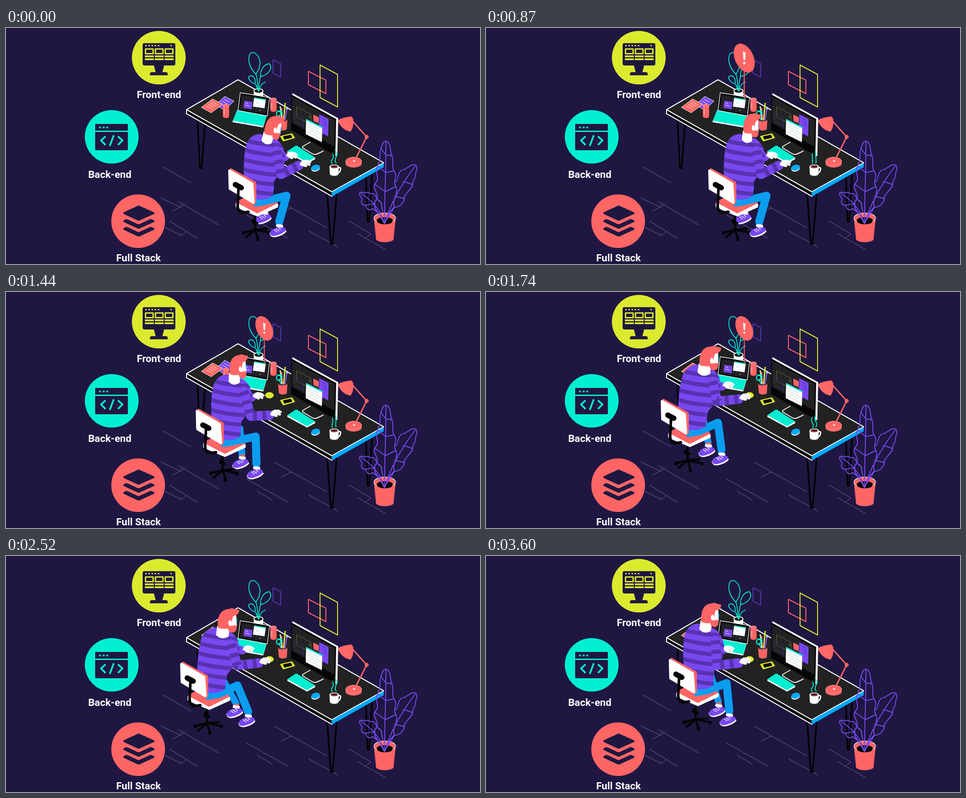
Write an HTML page that moves like this. It is 1058x529 px and loops after 3.63 s.

```html
<!DOCTYPE html>
<html lang="en">
<head>
<meta charset="utf-8">
<title>Developer at a desk</title>
<style>
html, body { margin: 0; width: 100%; height: 100%; overflow: hidden; background: #1f1742; }
svg { display: block; width: 100%; height: 100%; }
text { font: 700 22.5px Roboto, Arial, sans-serif; fill: #fff; }
.bg { fill: #1f1742; } .y { fill: #dcea2e; } .t { fill: #00efd1; } .c { fill: #ff6565; }
.p { fill: #7848f0; } .b { fill: #00a9ff; } .w { fill: #fff; } .k { fill: #050505; }
.line { fill: none; stroke-linecap: round; stroke-linejoin: round; }
.butt { stroke-linecap: butt; }
.sy { stroke: #dcea2e; } .st { stroke: #00efd1; } .sc { stroke: #ff6565; }
.sp { stroke: #7848f0; } .sd { stroke: #5733b0; } .sb { stroke: #0a9df0; }
.sw { stroke: #fff; } .sk { stroke: #050505; } .sf { stroke: #51456f; }
#sign { transform-origin: 577px 158px; animation: sign 3630ms linear infinite; }
@keyframes sign {
  0%, 19.3% { transform: scale(0); opacity: 1; }
  23.7% { transform: scale(1.2); }
  27.5%, 57.3% { transform: none; opacity: 1; }
  61.2%, 99.9% { transform: none; opacity: 0; }
  100% { transform: scale(0); opacity: 0; }
}
#steam { animation: steam 605ms ease-in-out infinite alternate; }
@keyframes steam {
  from { d: path("M728 304C721 297 736 292 729 282M737 303C729 294 744 288 735 274"); }
  to { d: path("M729 304C736 297 722 292 728 281M736 303C744 294 729 288 736 277"); }
}
</style>
</head>
<body>
<svg viewBox="0 0 1058 529" preserveAspectRatio="none">
<defs>
  <clipPath id="shirt"><path id="shirtShape" d="M570 238C555 236 541 246 536 263C530 288 530 318 532 350L558 384Q580 388 596 376L598 344C604 334 614 326 620 308Q626 288 618 267Q611 252 597 246Q582 258 570 238Z"/></clipPath>
  <g id="can"><path class="c" d="M-7 0V24A7 4 0 0 0 7 24V0Z"/><ellipse rx="7" ry="4" fill="#ff8d88"/><ellipse rx="4" ry="2" class="c"/><path class="line sw" stroke-width=".8" d="M-4 8V20"/></g>
  <g id="shoe">
    <path class="w" d="M-18 4Q-17 13-6 13Q14 9 20 0L18-4L-16 2Z"/>
    <path class="p" d="M-17 5Q-16-5-3-8L7-11Q18-10 19-3Q12 6-6 10Q-16 11-17 5Z"/>
    <path class="line sw" stroke-width="1.5" d="M-7-4L-1 1M-3-6L4-1M3-8L7-4"/>
    <path class="line sw" stroke-width="7" d="M0-13L9-12"/>
  </g>
  <g id="hand">
    <path class="w" d="M-13 2Q-11-7-1-8L8-6L14-1L13 2L10 2L11 6L8 8L3 5L3 8L-1 9L-6 6Z"/>
    <path class="line" stroke="#aaa" stroke-width=".7" d="M3-2L10 2M0 1L6 5"/>
  </g>
</defs>

<!-- services -->
<circle class="y" cx="341" cy="66.500" r="60"/>
<g class="bg">
  <rect x="305" y="34" width="73" height="50" rx="4"/>
  <path d="M330 84H353L349 99H358Q361 99 361 106H321Q321 99 325 99H334Z"/>
</g>
<path class="line butt sy" stroke-width="3" stroke-dasharray="3 4" d="M311 39.500H344M367 39.500H371"/>
<g id="panes" class="line butt sy"></g>
<text x="292" y="156.500">Front-end</text>

<circle class="t" cx="236" cy="244" r="60"/>
<rect class="bg" x="199" y="215" width="73" height="59" rx="2"/>
<path class="line butt st" stroke-width="4" stroke-dasharray="4 4" d="M208 223H230"/>
<path class="line butt st" stroke-width="3" d="M199 231.500H272"/>
<path class="line st" stroke-width="4" d="M221 244L212 252L221 261M240 242L232 263M251 244L260 252L251 261"/>
<text x="183.500" y="335.500">Back-end</text>

<circle class="c" cx="295" cy="433" r="60"/>
<g class="bg">
  <path d="M293 399Q296 397 299 399L330 413Q333 415 330 417L299 431Q296 433 293 431L263 417Q260 415 263 413Z"/>
  <path id="layer" d="M263 431L269 428L293 439Q296 441 299 439L323 428L330 431Q333 433 330 435L299 449Q296 451 293 449L263 435Q260 433 263 431Z"/>
  <use href="#layer" y="17.500"/>
</g>
<text x="246" y="523">Full Stack</text>

<!-- floor and wall -->
<path class="line sf" stroke-width="1.500" d="M349 311L413 347M346 381L391 403M386 390L474 441M372 411L398 395M366 433L426 471M352 446L392 465M389 466L404 456M600 382L716 448M614 415L638 403M537 419L628 471M561 447L594 466M676 455L741 491M765 432L815 462M785 461L848 497M800 472L815 462"/>
<g class="line" stroke-width="2">
  <path stroke="#5335a6" d="M596 71L613 80V110L596 101Z"/>
  <path class="sc" d="M675 97L714 117V147L675 127Z"/>
  <path class="sy" d="M701 83L740 104V177L701 156Z"/>
</g>

<!-- desk -->
<path class="line sk" stroke-width="4" d="M427 205L433 314H437L444 214M803 322L807 434H811L818 316M717 371L725 484H729L738 371"/>
<path class="k" d="M403 183V193L727 378V367Z"/>
<path class="b" d="M727 367L843 302V312L727 378Z"/>
<path fill="#222223" d="M518 116L403 183L727 368L843 302Z"/>
<path class="line sw" stroke-width="2.200" d="M727 367L403 183L518 116L843 302M403 184V192L727 377"/>
<path class="line sw" stroke-width="1.800" d="M727 367L843 302"/>

<!-- papers, cans -->
<path class="p" stroke="#fff" d="M488 153L509 164L487 184L469 172Z"/>
<path class="c" stroke="#fff" d="M461 159L484 171L458 190L436 178Z"/>
<path class="line sw" stroke-width="1" d="M459 165L473 172M455 168L469 175M451 171L464 178M447 175L459 181M487 160L499 166M483 164L494 170"/>
<use href="#can" x="491" y="174"/>

<!-- small plant -->
<path class="w" d="M553 141V153A10 5 0 0 0 574 153V141Z"/>
<ellipse class="k" cx="563.500" cy="141" rx="10" ry="5" stroke="#fff" stroke-width="2"/>
<path class="line st" stroke-width="1.800" d="M562 141C561 126 562 113 558 104C546 92 538 74 544 59C551 48 566 60 567 78C567 90 562 96 558 104M564 141C564 128 566 116 568 109C567 96 574 82 587 80C596 86 590 104 568 109M562 141C561 133 559 129 556 125C546 122 540 114 542 109C550 103 558 112 556 125M565 141C566 131 571 124 579 121"/>
<use href="#can" x="597" y="160"/>

<!-- laptop -->
<path class="w" d="M516 184L582 196L574 223L505 211Z"/>
<path class="t" d="M517 183L582 195L574 220L506 208Z"/>
<path class="k" stroke="#fff" stroke-width="1.300" d="M523 145L588 156L583 197L518 185Z"/>
<path fill="#222127" d="M526 150L584 159L580 192L522 182Z"/>
<path class="p" d="M532 163L550 166L548 182L530 179Z"/>
<path class="w" d="M554 156L580 160L577 180L551 176Z"/>
<path class="line st" stroke-width="2" d="M555 157L579 161"/>
<path class="line sw" stroke-width="1" d="M535 168L540 169M534 173L544 175M566 184H568"/>

<!-- desk things -->
<path class="line sy" stroke-width="3" d="M623 169L620 206"/>
<path class="line sc" stroke-width="3" d="M615 180L617 206"/>
<path class="line sp" stroke-width="3" d="M627 181L623 206"/>
<path class="line sw" stroke-width="2" d="M612 176L616 205M628 178L627 182"/>
<path class="line st" stroke-width="2.500" d="M614 206L610 196M612 196A4 5 0 1 1 605 188A4 5 0 1 1 612 196M609 187A4 4 0 1 1 615 193"/>
<path class="c" d="M607 205L609 225A9 5 0 0 0 627 225L628 205A10 4 0 0 1 607 205Z"/>
<path class="y" stroke="#dcea2e" stroke-width="2" stroke-linejoin="round" d="M613 243L638 237L644 246L619 253Z"/>
<path class="k" d="M618 243L636 239L639 246L621 250Z"/>
<ellipse class="y" cx="588" cy="231.500" rx="9.500" ry="7"/>

<path class="line sw" stroke-width="2" d="M679 256L663 265Q660 268 664 270L684 282Q689 285 695 282L708 276"/>
<path class="w" stroke="#fff" stroke-width="3" stroke-linejoin="round" d="M640 148L740 203L738 286L735 284Z"/>
<path class="k" d="M637 149L737 204L735 286L636 228Z"/>
<path fill="#222225" d="M639 154L734 206L733 266L638 212Z"/>
<g class="line" stroke-width="1">
  <path stroke="#6b7030" d="M649 177L681 194V216L649 200Z"/>
  <path stroke="#493185" d="M645 190L663 200V220L645 210Z"/>
</g>
<path class="c" d="M686 194L698 200V214L686 208Z"/>
<path class="p" d="M699 193L720 204L719 243L699 233Z"/>
<path class="w" d="M670 204L706 222L705 256L669 238Z"/>
<path class="line st" stroke-width="3" d="M671 206L705 223"/>
<path class="line" stroke="#b8c4c9" stroke-width="1" d="M673 215L698 228M673 221L701 235M673 227L697 239M673 233L700 247"/>
<path class="line" stroke="#4c2aaa" stroke-width="1" d="M703 201L715 207M707 210L716 214M708 217L716 221"/>
<circle class="w" cx="678" cy="199" r="1"/>

<path class="w" d="M628 277L648 264L690 291V294L672 304L628 280Z"/>
<path class="t" d="M628 276L648 263L690 290L672 301Z"/>
<ellipse class="w" cx="691" cy="315" rx="10" ry="6.500" transform="rotate(-15 691 315)"/>
<ellipse class="b" cx="691" cy="313" rx="10" ry="6.500" transform="rotate(-15 691 313)"/>

<path class="line sw" stroke-width="3" d="M742 313Q749 311 746 320Q744 325 740 325"/>
<path class="w" d="M722 311L723 328A10 5 0 0 0 742 328L743 311Z"/>
<ellipse cx="732.500" cy="311" rx="10.500" ry="5" class="w"/>
<ellipse cx="732.500" cy="311" rx="8" ry="3.500" fill="#54201f"/>
<path class="line sc" stroke-width="1" d="M727 312Q733 316 738 312"/>
<path id="steam" class="line st" stroke-width="2" d="M728 304C721 297 736 292 729 282M737 303C729 294 744 288 735 274"/>

<path class="c" d="M758 299V304A18 9 0 0 0 794 304V299Z"/>
<ellipse class="c" cx="776" cy="299" rx="18" ry="9.500" stroke="#ff9a94"/>
<path class="line sc" stroke-width="3" d="M779 296L805 244L772 207"/>
<circle class="c" cx="805" cy="244" r="4.500"/>
<circle class="w" cx="777" cy="298" r="2"/>
<path class="c" d="M766 199Q773 196 775 205Q777 222 769 232Q750 230 740 207Q752 200 766 199Z"/>
<path class="line" stroke="#ff9a94" stroke-width="1" d="M740 207Q757 212 769 232"/>

<!-- big plant -->
<path class="c" d="M821 425L826 474A20 8 0 0 0 865 474L870 425Z"/>
<ellipse class="c" cx="845.500" cy="426" rx="24" ry="11.500" stroke="#fff" stroke-width="1.200"/>
<ellipse class="k" cx="845.500" cy="432" rx="18" ry="8"/>
<path class="line sp" stroke-width="2" d="M845 438C844 400 848 340 848 254M845 438C836 416 818 406 823 390C838 375 818 363 823 350C837 336 822 326 829 309C839 296 831 286 837 270Q842 251 850 254C861 262 856 274 861 286C868 300 859 309 866 320C876 333 862 344 870 355C878 370 862 383 866 395C868 410 853 419 845 438
M846 438C855 402 878 356 913 310M846 438C850 420 861 407 865 403C882 400 888 392 889 382C888 371 901 368 908 351C905 342 917 336 914 326Q920 311 914 307C899 305 897 317 884 318C873 325 878 335 870 345
M844 438C837 410 818 387 793 371M844 438C835 419 831 412 818 405C807 413 803 401 804 397C789 398 794 387 795 383Q785 371 792 368C803 371 808 366 813 371C824 369 825 379 831 386C842 391 837 402 841 411
M823 350L847 367L870 355M829 309L848 324L866 320M889 382L870 378M908 351L887 344M804 397L824 394M837 270L848 285L861 286"/>

<g id="sign">
  <path class="line sc" stroke-width="2" d="M576.500 105V158"/>
  <ellipse class="c" cx="576.500" cy="81.500" rx="17.500" ry="29" transform="rotate(-24 576.500 81.500)"/>
  <path class="w" d="M574 69L579 71L578 86L575 85Z"/><circle class="w" cx="576.500" cy="91" r="2.200"/>
</g>

<!-- person -->
<path id="farArm" class="line sp" stroke-width="18"/>
<use id="farHand" href="#hand"/>
<path id="farLeg" class="line sb" stroke-width="15"/>
<g id="farShoe"><use href="#shoe"/><path class="line sc" stroke-width="4" d="M1-18L9-17"/></g>
<g class="chair">
  <path class="line sk" stroke-width="5" d="M556 412V452M556 452L529 459M556 452L588 459M556 452L562 472M556 452L536 469M556 452L582 450M551 432L561 438"/>
  <path class="line sk" stroke-width="7" d="M530 458V460M588 459V461M562 471V475M552 431V435"/>
  <path class="w" stroke="#fff" stroke-width="5" stroke-linejoin="round" d="M515 394L560 372L605 396V400L561 420L515 400Z"/>
  <path class="c" stroke="#ff6565" stroke-width="3" stroke-linejoin="round" d="M515 390L560 368L605 392L561 414Z"/>
</g>
<path id="nearLeg" class="line sb" stroke-width="18"/>
<g id="torso">
  <use href="#shirtShape" class="p"/>
  <path id="stripes" class="line sd" stroke-width="9" clip-path="url(#shirt)"/>
</g>
<use id="nearShoe" href="#shoe"/>
<g id="head">
  <path class="w" d="M-12-18L-15 2Q-4 15 13 6L16-14Z"/>
  <path class="w" d="M12-41L31-42L32-16L14-10Z"/>
  <path class="c" d="M12-20L20-18L31-19Q33-6 25-3Q15-2 12-9Z"/>
  <path class="c" d="M-10-14C-13-40-3-56 17-56Q22-59 25-56Q32-54 38-53Q38-44 29-41L24-39Q21-32 21-24L17-19L13-12Q0-10-10-14Z"/>
  <ellipse class="w" cx="17" cy="-24" rx="4" ry="6.500"/>
  <path class="line sb" stroke-width="2" d="M32-32V-26"/>
</g>
<path id="nearArm" class="line sp" stroke-width="21"/>
<path id="sleeve" class="line butt sd" stroke-width="21" stroke-dasharray="9 12"/>
<use id="nearHand" href="#hand"/>
<g class="chair">
  <path class="c" stroke="#ff6565" stroke-width="5" stroke-linejoin="round" d="M502 317L556 347V392L551 394L500 330Z"/>
  <path class="w" stroke="#fff" stroke-width="6" stroke-linejoin="round" d="M499 320L549 349L552 391L500 360Z"/>
  <path class="line sk" stroke-width="12" d="M512 351L525 358"/>
  <path class="line sk" stroke-width="6" d="M519 358L517 398Q517 413 528 414L541 412"/>
</g>
</svg>

<script>
const LOOP = 3630;
const $ = id => document.getElementById(id);

// Each row: time in ms, then the values at that time.
const tracks = {
  chair: [[0, 0, 0, 0], [930, 0, 0, 0], [1080, -4, -3, -8], [1200, -9, -8, -13], [1600, -107, -77, 6],
    [1740, -106, -75, 10], [2160, -109, -77, 12], [2820, -106, -78, 5], [3230, -88, -86, -5]],
  head: [[0, 3, 8, .85], [300, 1, 3, .8], [510, 0, -3, .79], [930, 0, 0, .8], [1200, 1, -6, .8],
    [1740, 5, 0, 1], [2160, 6, 0, 1], [2820, 3, -2, 1], [3300, 0, 0, .97], [3600, 0, 0, .92]],
  farHand: [[930, 638, 285], [1200, 593, 264], [1640, 541, 208]],
  nearHand: [[930, 668, 303], [1200, 634, 319], [1640, 578, 235]],
  elbow: [[930, 614, 328], [1200, 586, 322], [1640, 516, 245]],
  knee: [[930, 626, 376], [1200, 618, 372], [1620, 518, 293], [2160, 516, 293], [2820, 517, 288], [3230, 537, 285]],
  farFoot: [[930, 573, 427], [1200, 570, 426], [1620, 492, 357], [2200, 492, 357], [2650, 514, 349], [3230, 515, 348]],
  nearFoot: [[930, 606, 456], [1200, 606, 455], [1620, 522, 376], [2160, 520, 375], [2650, 540, 370], [3230, 539, 369]]
};

function sample(rows, t) {
  const i = rows.findIndex(r => r[0] > t);
  if (i === 0) return rows[0].slice(1);
  if (i < 0) return rows[rows.length - 1].slice(1);
  const a = rows[i - 1], b = rows[i];
  const u = (t - a[0]) / (b[0] - a[0]), e = u * u * (3 - 2 * u);
  return a.slice(1).map((v, k) => v + (b[k + 1] - v) * e);
}

const place = (el, x, y, more = "") => el.setAttribute("transform", `translate(${x} ${y}) ${more}`);
const trace = (id, ...points) => $(id).setAttribute("d", "M" + points.join("L"));

function draw(t) {
  const p = {};
  for (const name in tracks) p[name] = sample(tracks[name], t);
  const [cx, cy, lean] = p.chair;
  const [nod, turn, wide] = p.head;
  const at = (x, y) => [cx + x, cy + y];
  const near = p.nearHand, far = p.farHand;

  document.querySelectorAll(".chair").forEach(el => place(el, cx, cy));
  const k = -lean / 137;
  $("torso").setAttribute("transform", `matrix(1 0 ${k} 1 ${cx - 385 * k} ${cy})`);
  place($("head"), cx + 583 + lean, cy + 248 + nod, `rotate(${turn}) scale(${wide} 1)`);

  trace("farArm", at(609 + lean * .7, 283), [far[0] - 14, far[1] + 4]);
  place($("farHand"), ...far);
  const arm = [at(604 + lean * .8, 275), p.elbow, [near[0] - 14, near[1] + 5]];
  trace("nearArm", ...arm);
  trace("sleeve", ...arm);
  place($("nearHand"), ...near, "rotate(-12)");

  const [fx, fy] = p.farFoot, [nx, ny] = p.nearFoot, [kx, ky] = p.knee;
  trace("farLeg", at(565, 374), [kx - 35, ky - 18], [fx + 4, fy - 20]);
  trace("nearLeg", at(558, 391), at(582, 387), [kx, ky], [nx + 4, ny - 22]);
  place($("farShoe"), fx, fy);
  place($("nearShoe"), nx, ny);
}

$("panes").innerHTML = [311.5, 333.5, 355.5].map(x =>
  `<path stroke-width="3" d="M${x} 47h17v10.500h-17z"/>
   <path stroke-width="4" d="M${x - 1.5} 63.500h20m-20 6.500h20"/>`).join("");
$("stripes").setAttribute("d", [256, 278, 300, 322, 344, 366].map(y => `M520 ${y - 9}Q565 ${y + 8} 640 ${y + 8}`).join(""));

let start;
function tick(now) {
  start ??= now;
  draw((now - start) % LOOP);
  requestAnimationFrame(tick);
}
draw(0);
requestAnimationFrame(tick);
</script>
</body>
</html>
```
